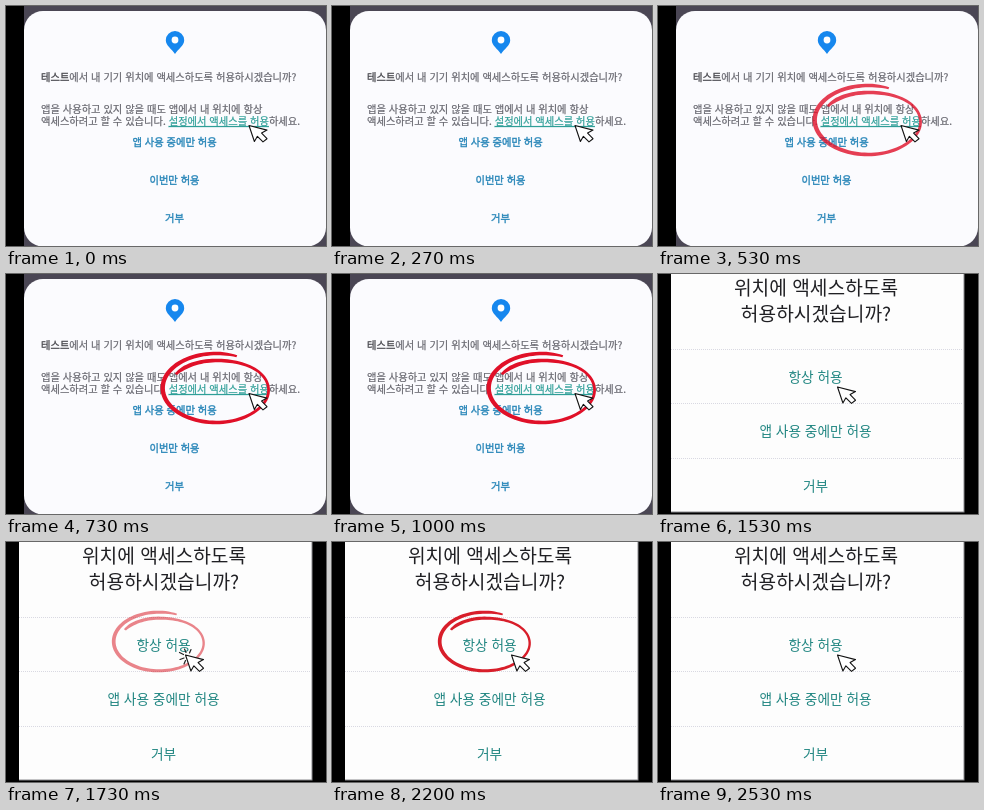
Recreate the animation shown at these times as an HTML page. Size 320 by 240 pixels, loop 2590 ms.

```html
<!DOCTYPE html>
<html lang="ko">
<head>
<meta charset="utf-8">
<title>위치 권한 허용</title>
<style>
  html, body { margin: 0; width: 100%; height: 100%; overflow: hidden; background: #000; }
  svg { display: block; width: 100vw; height: 100vh; }
  text { font-family: "Noto Sans CJK KR", "Noto Sans CJK", sans-serif; }
  .body { font-size: 10.28px; fill: #66666e; stroke: #66666e; stroke-width: .2; }
  .strong { fill: #48484e; stroke: #48484e; stroke-width: .3; }
  .link { fill: #2f9f98; stroke: #2f9f98; }
  .btn { font-size: 10.28px; fill: #2785b8; stroke: #2785b8; stroke-width: .35; text-anchor: middle; }
  .title { font-size: 19.2px; fill: #202024; text-anchor: middle; }
  .option { font-size: 13.7px; fill: #1f8580; text-anchor: middle; }
  .rule { stroke: #d9d9e2; stroke-width: 1; stroke-dasharray: 1 1; }
</style>
</head>
<body>
<svg viewBox="0 0 320 240" preserveAspectRatio="none">
  <defs>
    <path id="ring"/>
    <path id="arrow" d="M0 0L18 4.6L12.6 7.6L18 13.2L14 16.4L8.4 10.8L5.4 16Z"
      fill="#fff" stroke="#111" stroke-width="1.1" stroke-linejoin="round"/>
  </defs>
  <rect width="320" height="240" fill="#000"/>

  <g id="dialog">
    <rect x="18" width="302" height="240" fill="#4a4654"/>
    <rect x="18" y="5" width="302" height="235.500" rx="19" fill="#fbfbfe"/>
    <path d="M169 48C166 43 159.800 39.500 159.800 34.200A9.200 9.200 0 0 1 178.200 34.200C178.200 39.500 172 43 169 48Z" fill="#1687ee"/>
    <circle cx="169" cy="34" r="3.4" fill="#fff"/>
    <text class="body" x="35" y="74.800"><tspan class="strong">테스트</tspan>에서 내 기기 위치에 액세스하도록 허용하시겠습니까?</text>
    <text class="body" x="35" y="107">앱을 사용하고 있지 않을 때도 앱에서 내 위치에 항상</text>
    <text class="body" x="35" y="119">액세스하려고 할 수 있습니다. <tspan class="link" text-decoration="underline">설정에서 액세스를 허용</tspan>하세요.</text>
    <text class="btn" x="168.500" y="140">앱 사용 중에만 허용</text>
    <text class="btn" x="168.500" y="178">이번만 허용</text>
    <text class="btn" x="168.500" y="216">거부</text>
    <use id="ringA" href="#ring" fill="#e01028" transform="translate(210 114)"/>
    <use href="#arrow" x="243" y="119.500"/>
  </g>

  <g id="menu">
    <rect x="13" width="293.500" height="238.500" fill="#8a8a8e"/>
    <rect x="13" width="292.500" height="237.500" fill="#fdfdfd"/>
    <path class="rule" d="M13 75.500H305M13 129.500H305M13 184.500H305"/>
    <text class="title" x="158" y="21">위치에 액세스하도록</text>
    <text class="title" x="158" y="46.500">허용하시겠습니까?</text>
    <text class="option" x="157.500" y="108">항상 허용</text>
    <text class="option" x="157.500" y="162">앱 사용 중에만 허용</text>
    <text class="option" x="157.500" y="217">거부</text>
    <use id="ringB" href="#ring" fill="#d81e2a" transform="translate(153 99.500) scale(.85)"/>
    <path id="click" d="M178 116L174 117.500M177.500 112.500L173.500 110.500M180 110.500L178.500 107M183.500 111L185 107.500M179.500 118.500L178 122"
      fill="none" stroke="#222" stroke-width="1.200" stroke-linecap="round"/>
    <use href="#arrow" x="179.500" y="113"/>
  </g>
</svg>
<script>
const LOOP = 2590, STEPS = 39, STEP = LOOP / STEPS, CUT = 1390;
const el = id => document.getElementById(id);
const clamp = v => Math.max(0, Math.min(1, v));
const ramp = (t, a, b) => clamp((t - a) / (b - a));

// Brush ring: a spiral centre line, thicker on its left side.
function ringPath() {
  const outer = [], inner = [], n = 120;
  for (let i = 0; i <= n; i++) {
    const u = i / n, deg = 67 + 443 * u, a = -deg * Math.PI / 180;
    const k = ramp(deg, 335, 450);
    const shrink = 7 * k * k * (3 - 2 * k);
    const rx = 53.3 - shrink, ry = 34.5 - shrink;
    const taper = 0.65 + 0.35 * ramp(Math.min(u, 1 - u), 0, 0.04);
    const half = (1.8 - 0.4 * Math.cos(a)) * taper;
    const point = d => ((rx + d) * Math.cos(a)).toFixed(2) + " " + ((ry + d) * Math.sin(a)).toFixed(2);
    outer.push(point(half));
    inner.unshift(point(-half));
  }
  return "M" + outer.concat(inner).join("L") + "Z";
}
el("ring").setAttribute("d", ringPath());

const show = (id, on) => el(id).setAttribute("visibility", on ? "visible" : "hidden");
const fade = (id, v) => el(id).setAttribute("opacity", v.toFixed(3));

function draw(ms) {
  const t = Math.floor((ms % LOOP) / STEP + 0.1) % STEPS * STEP;
  const second = t >= CUT;
  show("dialog", !second);
  show("menu", second);
  show("click", second && t > 1590 && t < 1800);
  fade("ringA", ramp(t, 315, 585));
  fade("ringB", ramp(t, 1580, 1850) * (1 - ramp(t, 2330, 2500)));
}

const start = performance.now();
function tick() {
  draw(performance.now() - start);
  requestAnimationFrame(tick);
}
draw(0);
requestAnimationFrame(tick);
</script>
</body>
</html>
```
